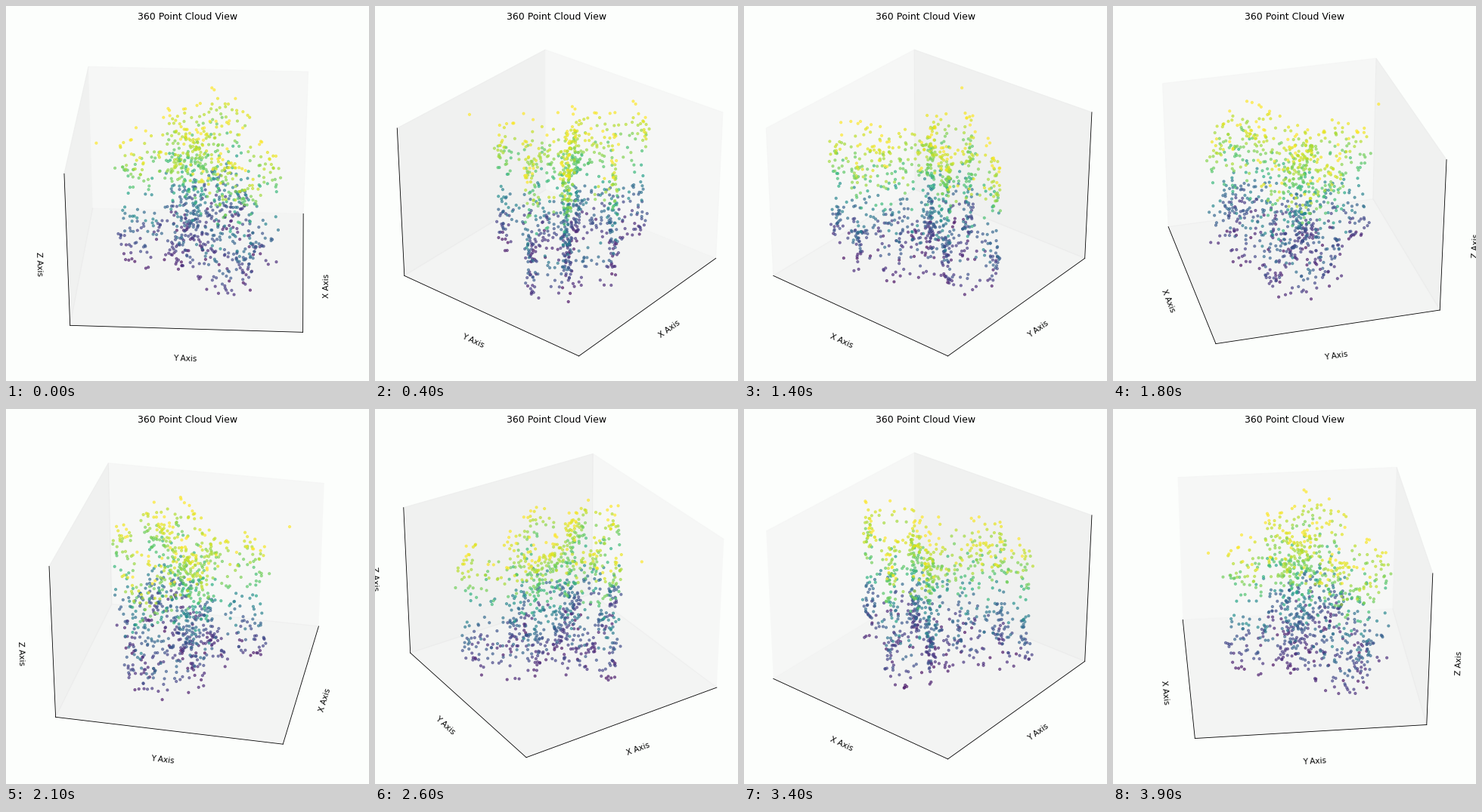
Write a matplotlib script that moves like this. It is 480x497 px and loops after 4000 ms.

```python
import numpy as np
import matplotlib.pyplot as plt
from matplotlib.animation import FuncAnimation

W, H, DPI = 480, 497, 75
PAD = 7.4
SIDE = W - 2 * PAD
FRAMES, INTERVAL = 40, 100
START, STEP = 3, 360 / FRAMES   # azimuth in degrees
HALF_XY, HALF_Z = 0.595, 0.446
TURN = np.radians(39)           # heading of the building's walls
TOP = 0.39
DENSITY = 190                   # points per unit of wall length

# Opposite corners of the building's wings, across and along its heading
WINGS = [
    ((-0.32, -0.21), (0.08, 0.00)),
    ((-0.16, 0.00), (0.03, 0.50)),
    ((0.08, -0.33), (0.43, -0.08)),
    ((0.03, -0.08), (0.27, 0.38)),
]


def wing_points(rng, corner, opposite):
    """Random points on the four upright walls of one wing."""
    (p0, q0), (p1, q1) = corner, opposite
    p_path = [p0, p1, p1, p0, p0]
    q_path = [q0, q0, q1, q1, q0]
    lengths = np.hypot(np.diff(p_path), np.diff(q_path))
    dist = np.concatenate([[0], np.cumsum(lengths)])
    count = round(DENSITY * dist[-1])

    t = rng.uniform(0, dist[-1], count)
    p = np.interp(t, dist, p_path) + rng.normal(0, 0.016, count)
    q = np.interp(t, dist, q_path) + rng.normal(0, 0.016, count)
    # sparser at mid height
    z = TOP * rng.choice([-1, 1], count) * rng.triangular(0, 0.65, 1, count)
    x = q * np.cos(TURN) - p * np.sin(TURN)
    y = q * np.sin(TURN) + p * np.cos(TURN)
    return np.column_stack([x, y, z])


rng = np.random.default_rng(7)
stray = [(0.17, -0.48, TOP)]
cloud = np.vstack([wing_points(rng, *wing) for wing in WINGS] + [stray])
x, y, z = cloud.T

fig = plt.figure(figsize=(W / DPI, H / DPI), dpi=DPI, facecolor="#fcfefc")
fig.text(0.5, 1 - 18.4 / H, "360 Point Cloud View", size=12, ha="center")

ax = fig.add_axes([PAD / W, PAD / H, SIDE / W, SIDE / H], projection="3d")
ax.set_facecolor("none")
ax.scatter(x, y, z, c=z, cmap="viridis", s=9, alpha=0.6,
           vmin=-TOP, vmax=TOP * 0.85)

ax.set_xlim(-HALF_XY, HALF_XY, view_margin=0)
ax.set_ylim(-HALF_XY, HALF_XY, view_margin=0)
ax.set_zlim(-HALF_Z, HALF_Z, view_margin=0)
ax.grid(False)
ax.set(xticks=[], yticks=[], zticks=[],
       xlabel="X Axis", ylabel="Y Axis", zlabel="Z Axis")


def update(i):
    ax.view_init(elev=30, azim=START + STEP * i)
    return []


anim = FuncAnimation(fig, update, frames=FRAMES, interval=INTERVAL,
                     repeat=True, repeat_delay=0, blit=False)
plt.show()
```
